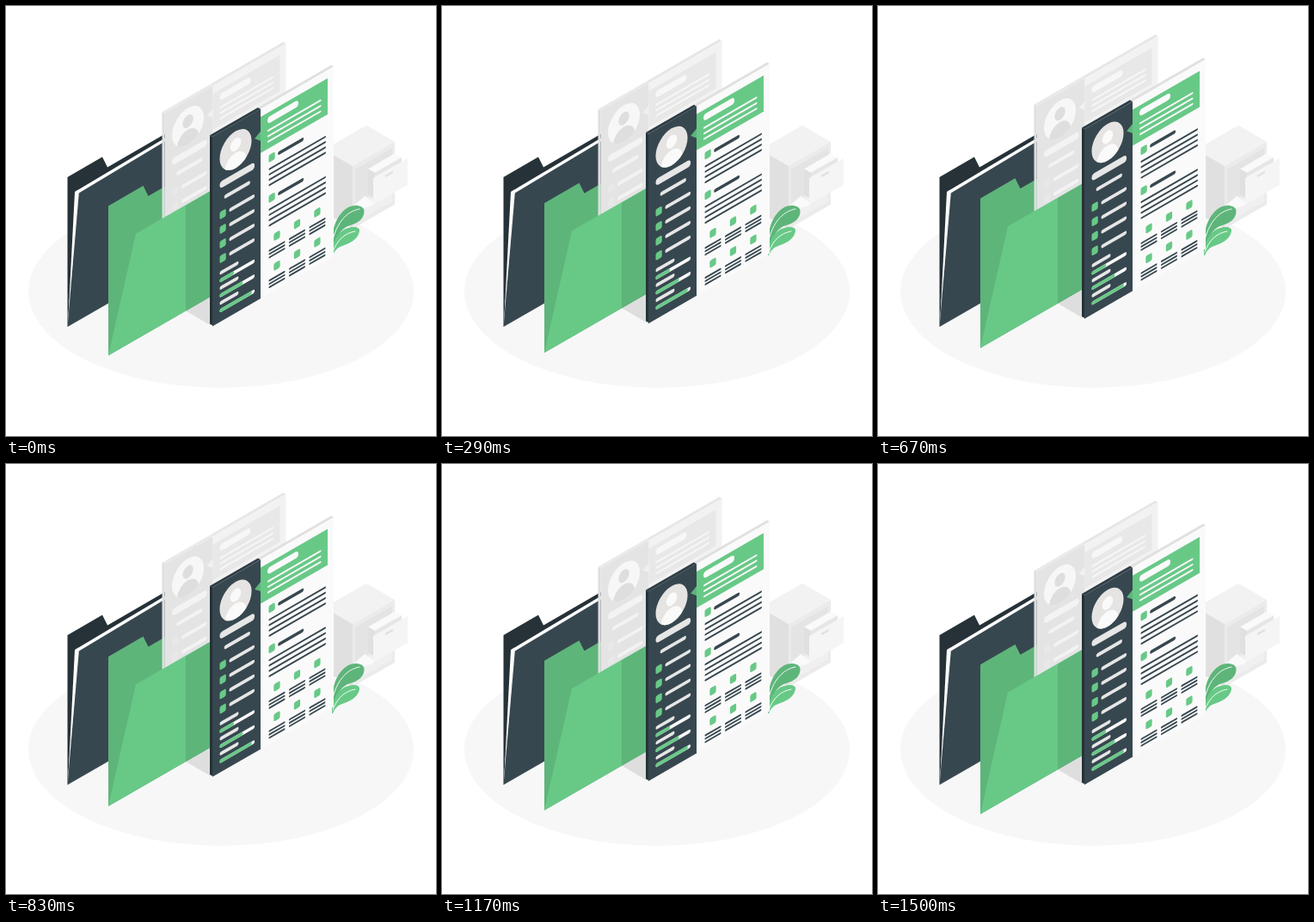
An HTML page that plays this animation: 500 by 500 pixels, repeating every 1540 ms.

```html
<!DOCTYPE html>
<html lang="en">
<head>
<meta charset="utf-8">
<title>Floating documents</title>
<style>
  html, body { margin: 0; height: 100%; overflow: hidden; background: #fff; }
  svg { display: block; width: 100vw; height: 100vh; }
</style>
</head>
<body>
<svg id="stage" viewBox="0 0 500 500"></svg>
<script>
const GREEN = '#68c987', SHADE = '#5eb57a', DARK = '#37474f', INK = '#263238';
const ISO = Math.tan(Math.PI / 6);

const path = (fill, d) => `<path fill="${fill}" d="${d}"/>`;
const stroke = (color, width, d) =>
  `<path fill="none" stroke="${color}" stroke-width="${width}" stroke-linecap="round" d="${d}"/>`;
const times = (n, draw) => Array.from({ length: n }, (_, i) => draw(i)).join('');

// Isometric faces: upright ones climb (dir -1) or fall (dir 1) to the right
const wall = (fill, x, y, w, h, dir = -1) =>
  path(fill, `M${x} ${y}l${w} ${dir * w * ISO}v${h}l${-w} ${-dir * w * ISO}z`);
const lid = (fill, x, y, right, left) =>
  path(fill, `M${x} ${y}l${right} ${-right * ISO} ${-left} ${-left * ISO} ${-right} ${right * ISO}z`);

const box = (x, y, right, left, h, top, side, front) =>
  lid(top, x, y, right, left) +
  wall(side, x - left, y - left * ISO, left, h, 1) +
  wall(front, x, y, right, h);

// Page contents
const SIDE = 64.7, WIDTH = 162.8, HEIGHT = 220.4, MARGIN = 9.8;
const bar = (color, x1, x2, y, w) => stroke(color, w, `M${x1 + w / 2} ${y}H${x2 - w / 2}`);
const bullet = (color, x, y) =>
  `<rect fill="${color}" x="${x - 4.2}" y="${y - 4.4}" width="8.4" height="8.8" rx="2"/>`;

function sidebar(c) {
  const right = SIDE - 8;
  return `<circle cx="31.2" cy="30.6" r="21.4" fill="${c.disc}"/>
    <g clip-path="url(#disc)" fill="${c.person}">
      <circle cx="31.2" cy="24.6" r="7.2"/><circle cx="31.2" cy="49" r="14.7"/>
    </g>` +
    bar(c.bar, MARGIN, right, 61.6, 8) +
    bar(c.bar, MARGIN + 6, right - 6, 78.3, 4.4) +
    times(4, i => {
      const y = 97 + 17 * i;
      return bullet(c.accent, MARGIN + 4.2, y) + bar(c.bar, 22.5, right, y, 4.2);
    }) +
    times(3, i => {
      const y = 163.9 + 17.5 * i;
      return bar(c.bar, MARGIN, 35.2, y, 4.2) +
        bar(c.track, MARGIN, right, y + 8.7, 4.2) +
        bar(c.accent, MARGIN, 29 + 12 * i, y + 8.7, 4.2);
    });
}

function mainColumn(c) {
  return `<rect x="${SIDE}" y="9.4" width="90" height="42" fill="${c.accent}"/>` +
    path(c.pointer, `M${SIDE - 8} 30.600l8-4.600v11z`) +
    bar(c.title, 73.9, 115.5, 18.5, 7.8) +
    times(3, i => bar(c.title, 73.9, 146, 30.4 + 6.4 * i, 2.2)) +
    times(2, section => {
      const y = 63.7 + 47 * section;
      return bullet(c.accent, 79.8, y) + bar(c.text, 88, 122.5, y, 4) +
        times(4, i => bar(c.text, 75.6, 152.4, y + 12.2 + 6.2 * i, 2.2));
    }) +
    times(6, i => {
      const x = 86.6 + 27.1 * (i % 3), y = 158.4 + 34.7 * Math.floor(i / 3);
      return bullet(c.accent, x, y) +
        times(3, k => bar(c.text, x - 11, x + 11, y + 12.3 + 3.9 * k, 2.1));
    });
}

// A thin upright page, its contents drawn in the isometric plane
function page(x, y, c) {
  return `<g transform="translate(${x} ${y})">` +
    wall(c.edge, -3, -1.8, 3, HEIGHT - 1, 1) +
    lid(c.sideTop, 0, 0, 56, 3) +
    lid(c.paperTop, 56, -56 * ISO, 85, 3) +
    `<g transform="matrix(.866 -.5 0 1 0 0)">
      <rect width="${SIDE + .2}" height="${HEIGHT}" fill="${c.side}"/>
      <rect x="${SIDE}" width="${WIDTH - SIDE}" height="${HEIGHT}" fill="${c.paper}"/>
      ${sidebar(c)}${mainColumn(c)}
    </g></g>`;
}

// Folder back with its tab, and sheets hinged on the folder's lower edge
const folderBack = (fill, x, y) =>
  path(fill, `M${x} ${y}l40.500-23.500 6 12 82-47.500V${y + 100}L${x} ${y + 174}z`);
const flap = (fill, x, y, dx, dy, top) =>
  path(fill, `M${x} ${y + 174}l${dx} ${dy - 174}L${x + 128.5} ${y + top}V${y + 100}z`);

const darkFolder =
  folderBack(INK, 71.5, 199) +
  path('#fff', 'M72 370L80 216l4-2.500z') +
  flap('#fff', 71.5, 199, 12, 15, -54.5) +
  flap(DARK, 71.5, 199, 13.3, 18.5, -50.8);

const cabinet =
  box(403, 186, 49, 33, 73, '#f2f2f2', '#e0e0e0', '#ebebeb') +
  wall('#e4e4e4', 406, 190, 43, 39) +
  wall('#f0f0f0', 406, 233, 43, 19) +
  path('#fafafa', 'M406 231l11-10 10 7v4l-14 4z') +
  box(429, 194, 31, 8, 30, '#fafafa', '#e0e0e0', '#e6e6e6') +
  wall('#f5f5f5', 427, 200, 40, 31) +
  stroke('#e0e0e0', 2.5, 'M442 197.500l7-4');

const leaves =
  path(SHADE, 'M379 286C377 262 384 242 398 234C406 230 416 232 416.500 238C417 247 409 253 400 255C390 258 384 267 381 286Z') +
  stroke('#fff', .9, 'M380 272C384 255 394 239 411 236') +
  path(GREEN, 'M379 290C379 275 386 261 398 258C405 256 412 257 411 262C409 272 399 276 391 279C385 281 382 285 380 290Z') +
  stroke('#fff', .9, 'M380 286C385 272 394 264 406 262');

const greyPage = {
  edge: '#dedede', side: '#e4e4e4', sideTop: '#e9e9e9', paper: '#f2f2f2', paperTop: '#e6e6e6',
  disc: '#f7f7f7', person: '#dedede', bar: '#f3f3f3', track: '#f3f3f3',
  accent: '#e8e8e8', pointer: '#f0f0f0', title: '#f7f7f7', text: '#e0e0e0'
};
const colorPage = {
  edge: INK, side: DARK, sideTop: '#2f3d45', paper: '#fafafa', paperTop: '#e0e0e0',
  disc: '#e6e4e3', person: '#fafafa', bar: '#e6e6e6', track: '#fafafa',
  accent: GREEN, pointer: SHADE, title: '#fafafa', text: DARK
};

document.getElementById('stage').innerHTML = `
  <defs><clipPath id="disc"><circle cx="31.2" cy="30.6" r="21.4"/></clipPath></defs>
  <ellipse cx="250" cy="332" rx="224" ry="112" fill="#f7f7f7"/>
  ${cabinet}${leaves}${darkFolder}
  <g id="floating">
    ${folderBack(SHADE, 119, 232.5)}
    ${page(184.5, 125, greyPage)}
    ${flap(GREEN, 119, 232.3, 32, 32.5, -23)}
    <path d="M209 232l30-17.300V372l-30-17.500z" opacity=".1"/>
    ${page(240, 152, colorPage)}
  </g>`;

// Linear rise and fall, stepped at 24 pictures per second
const LOOP = 1540, STEPS = 37, PEAK = 725, RISE = 10;
const floating = document.getElementById('floating');
const lift = t => RISE * (1 - Math.abs(t - PEAK) / (LOOP / 2));
const start = performance.now();

function draw(now) {
  const phase = Math.max(0, now - start) % LOOP;
  const t = Math.floor(phase / LOOP * STEPS) * LOOP / STEPS;
  floating.setAttribute('transform', `translate(0 ${(lift(0) - lift(t)).toFixed(2)})`);
  requestAnimationFrame(draw);
}
draw(start);
</script>
</body>
</html>
```
